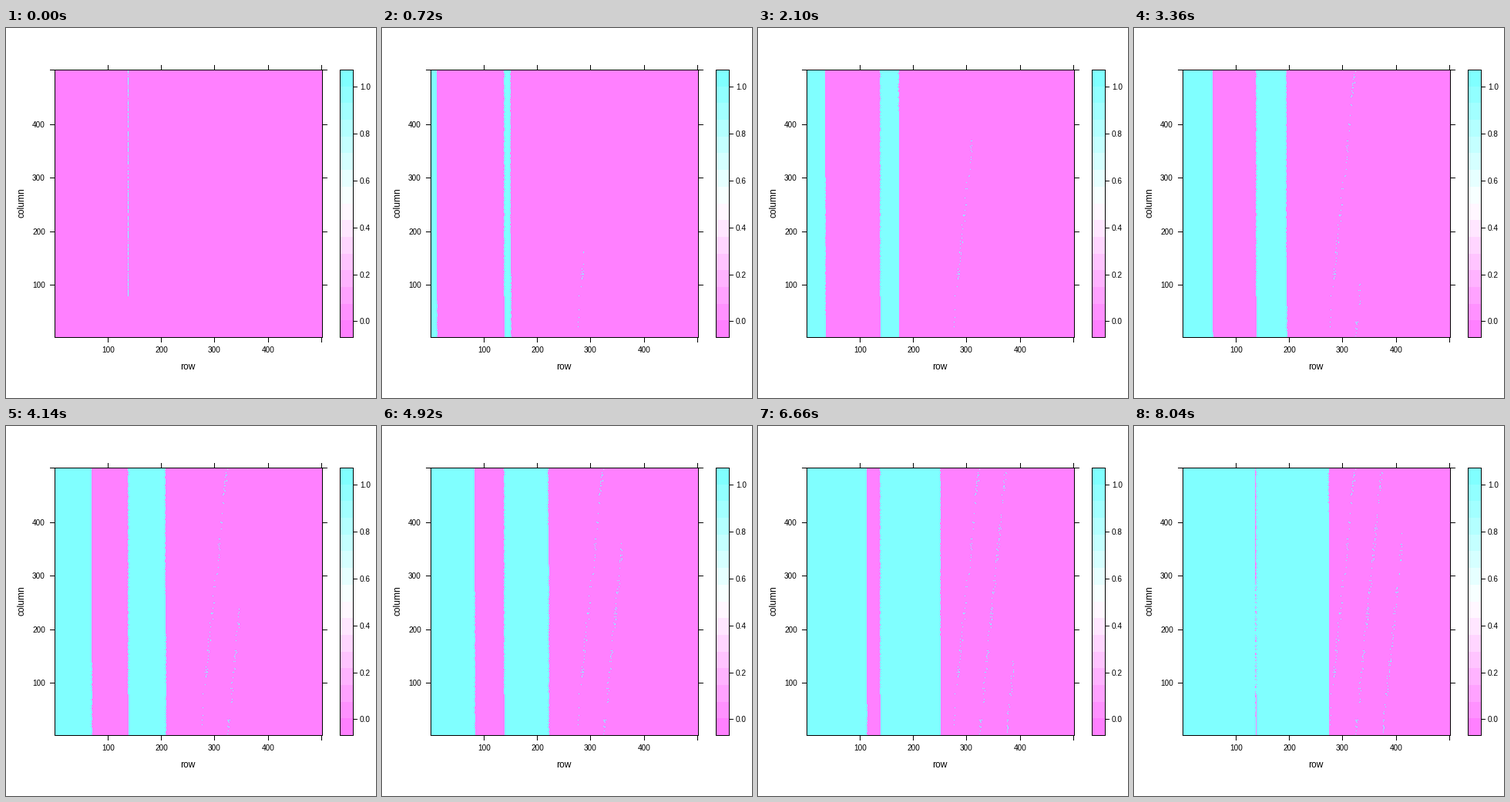
Animation, 480 px wide and 480 px high, one loop 8.1 s. Source, as a matplotlib script:

```python
import numpy as np
import matplotlib.pyplot as plt
from matplotlib.animation import FuncAnimation

SIZE, FRAMES, STEP = 480, 135, 60
N = 500                 # cells per side
PER_FRAME = 510         # cells each stream advances per frame
NEVER = 10 ** 6
PINK, CYAN = (255, 128, 255), (128, 255, 255)

rng = np.random.default_rng(7)
plt.rcParams["font.family"] = "Liberation Sans"


def reached(k, start):
    """Frame in which a stream starting at `start` gets past cell k."""
    return np.maximum(np.ceil((k + 1 - start) / PER_FRAME), 0)


def band(on, first_row, start, tail, density, skip=0, open_cells=0):
    """Solid band whose last `tail` cells are only partly filled."""
    base = first_row * N
    k = np.arange(137 * N + N)
    hit = rng.random(k.size) < density
    when = np.where(hit, reached(k, start), reached(k, start - tail))
    when[(k < open_cells) & ~hit] = NEVER
    when[:skip] = NEVER
    part = on[base:base + k.size]
    np.minimum(part, when, out=part)


def trail(on, first_row, start, span):
    """A few scattered cells behind the head of a stream."""
    for n in range(1, FRAMES):
        k = first_row * N + start + n * PER_FRAME - np.arange(1, span)
        chance = np.where(k % 10 == 8, 0.32, 0.06)
        k = k[rng.random(k.size) < chance]
        on[k] = np.minimum(on[k], n)


def switch_times():
    on = np.full(N * N, NEVER, float)
    band(on, 137, 500, 425, 0.68, skip=75, open_cells=500)
    band(on, 0, -50, 260, 0.68)
    trail(on, 275, 52, 50)
    on = on.reshape(N, N)
    # the last cell drawn on a pixel wins
    rows = np.ceil((np.arange(64, 410) + 1 - 63.53) / 0.6923).astype(int) - 1
    cols = np.ceil((np.arange(346) + 1) / 0.692).astype(int) - 1
    return on[np.ix_(rows.clip(0, N - 1), cols.clip(0, N - 1))].T[::-1]


def frame_box(img, x0, y0, x1, y1):
    img[y0, x0:x1 + 1] = img[y1, x0:x1 + 1] = 0
    img[y0:y1 + 1, x0] = img[y0:y1 + 1, x1] = 0


x_ticks = [132, 201, 270, 340, 409]
y_ticks = [333, 264, 194, 125, 54]
key_ticks = [380, 320, 259, 198, 137, 76]


def backdrop():
    img = np.full((SIZE, SIZE, 3), 255, np.uint8)
    edges = np.linspace(401, 54, 17).round().astype(int)
    for i in range(16):
        v = 2 * i / 15 - 1
        low = round(255 - 127 * abs(v))
        color = (255, low, 255) if v < 0 else (low, 255, 255)
        img[edges[i + 1]:edges[i], 433:451] = color
    frame_box(img, 433, 54, 450, 401)
    frame_box(img, 63, 54, 410, 401)
    for x in x_ticks:
        img[48:54, x] = img[402:408, x] = 0
    for y in y_ticks:
        img[y, 57:63] = img[y, 411:417] = 0
    for y in key_ticks:
        img[y, 451:456] = 0
    return img


def label(x, y, text, px=10, **kw):
    ax.text(x, y, text, fontsize=px * 0.72, va="baseline",
            rotation_mode="anchor", color="black", **kw)


base = backdrop()
times = switch_times()

fig = plt.figure(figsize=(4.8, 4.8), dpi=100, facecolor="white")
ax = fig.add_axes([0, 0, 1, 1])
ax.axis("off")
picture = ax.imshow(base, extent=(0, SIZE, SIZE, 0), interpolation="nearest",
                    aspect="auto")

for i in range(4):
    text = str(100 * (i + 1))
    label(x_ticks[i] + 0.5, 421, text, ha="center")
    label(51, y_ticks[i] + 4, text, ha="right")
for i, y in enumerate(key_ticks):
    label(459, y + 4, f"{i / 5:.1f}", ha="left")
label(236, 443, "row", 12, ha="center")
label(23, 226.5, "column", 12, ha="center", rotation=90)


def draw(n):
    img = base.copy()
    img[55:401, 64:410] = np.where((times <= n)[..., None], CYAN, PINK)
    picture.set_data(img)
    return [picture]


anim = FuncAnimation(fig, draw, frames=FRAMES, interval=STEP, repeat=True,
                     repeat_delay=0, blit=False)
plt.show()
```
